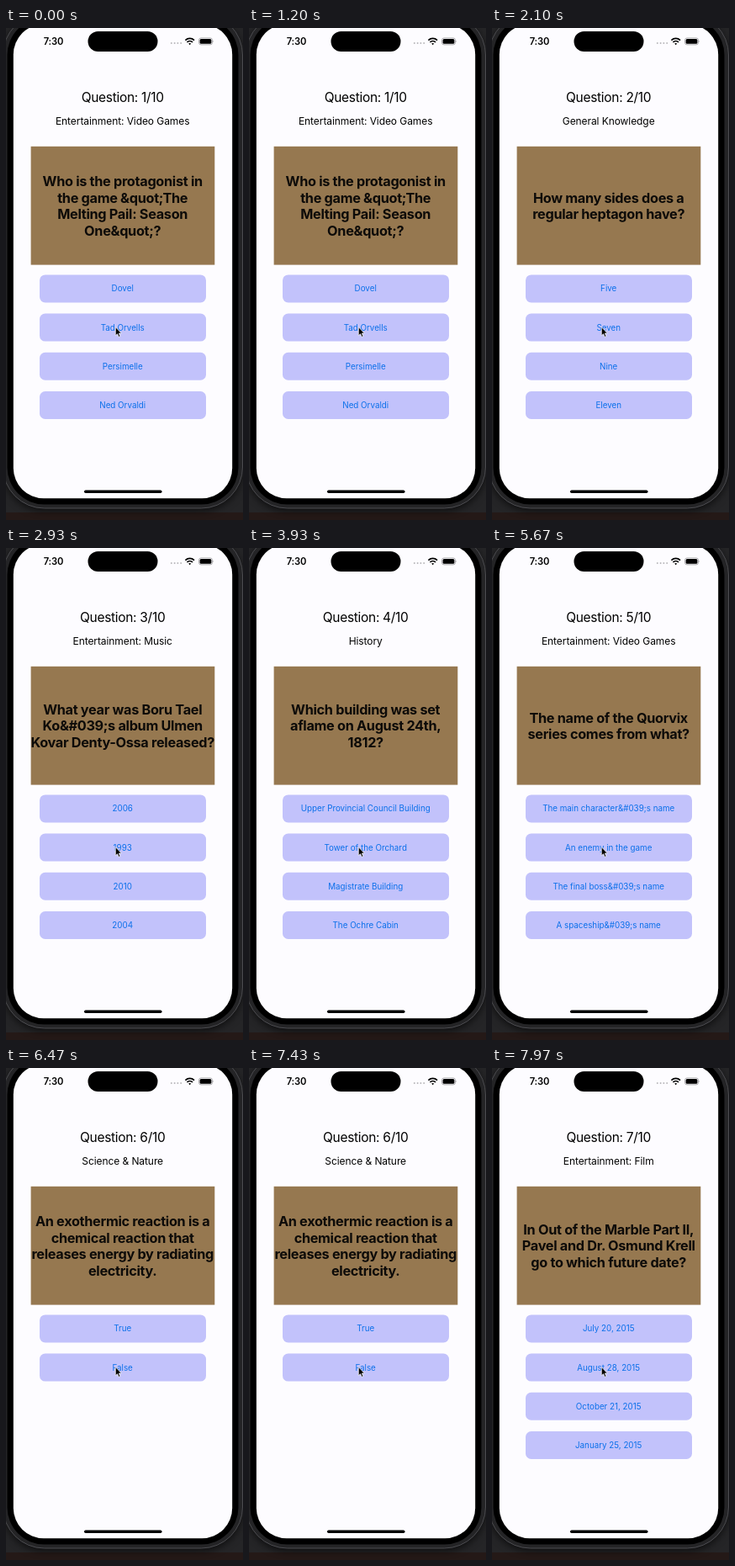
Animation, 282 px wide and 585 px high, one loop 8000 ms. Source, as an HTML page:

```html
<!DOCTYPE html>
<html lang="en">
<head>
<meta charset="utf-8">
<style>
  html, body { margin: 0; width: 100%; height: 100%; overflow: hidden; background: #252527; }
  svg { display: block; width: 282px; height: 585px; font-family: Inter, sans-serif; }
  .middle { text-anchor: middle; }
  .count { font-size: 15.5px; letter-spacing: -.3px; }
  .category { font-size: 12px; letter-spacing: -.08px; }
  .question { font-size: 16.3px; font-weight: 700; letter-spacing: -.32px; fill: #0d0b09; }
  .answer { font-size: 9.8px; fill: #0b70ea; }
  .clock { font-size: 11.2px; font-weight: 600; letter-spacing: -.1px; }
  .phone { filter: drop-shadow(0 3px 4px #0009); }
</style>
</head>
<body>
<svg viewBox="0 0 282 585">
  <rect y="576" width="282" height="9" fill="#241917"/>
  <rect class="phone" x="-3.5" y="-17" width="285" height="588" rx="49" fill="#242426" stroke="#4c4c50"/>
  <rect x="1.5" y="-12" width="275" height="578.5" rx="44"/>
  <rect x="8.8" y="-4.5" width="260.4" height="563.7" rx="36" fill="#fdfcff"/>

  <text class="clock middle" x="56.5" y="20">7:30</text>
  <rect x="97.5" y="4" width="83" height="24" rx="12"/>
  <g fill="#b9b8bc">
    <circle cx="196.8" cy="18" r="1"/><circle cx="200.6" cy="18" r="1"/>
    <circle cx="204.4" cy="18" r="1"/><circle cx="208.2" cy="18" r="1"/>
  </g>
  <g fill="none" stroke="#000" stroke-width="1.7">
    <path d="M213.4 14.6a7.6 7.6 0 0 1 10.6 0M215.4 16.9a4.7 4.7 0 0 1 6.6 0"/>
    <path d="M218.7 20.2l-1.5-1.6a2.2 2.2 0 0 1 3 0z" fill="#000" stroke="none"/>
  </g>
  <rect x="229.5" y="11.9" width="16" height="8" rx="2.5" fill="none" stroke="#8d8c90" stroke-width=".7"/>
  <rect x="230.6" y="13" width="13.8" height="5.8" rx="1.5"/>
  <path d="M246.5 14.6q1.3 1.3 0 2.6z" fill="#8d8c90"/>

  <rect x="29.6" y="140.8" width="218.7" height="140.8" fill="#967850"/>
  <g id="page"></g>
  <rect x="93" y="549.6" width="92.5" height="3.4" rx="1.7"/>
  <path d="M130.3 355.6v10.2l2.3-2.1 1.6 3.6 1.7-.8-1.6-3.5h3z" fill="#000" stroke="#fff" stroke-width=".7"/>
</svg>
<script>
const LOOP = 8000;
const CENTER = 138.7;
const page = document.getElementById("page");

const quiz = [
  { start: 0, category: "Entertainment: Video Games",
    lines: ["Who is the protagonist in", "the game &quot;The", "Melting Pail: Season", "One&quot;?"],
    answers: ["Dovel", "Tad Orvells", "Persimelle", "Ned Orvaldi"] },
  { start: 1700, category: "General Knowledge",
    lines: ["How many sides does a", "regular heptagon have?"],
    answers: ["Five", "Seven", "Nine", "Eleven"] },
  { start: 2700, category: "Entertainment: Music",
    lines: ["What year was Boru Tael", "Ko&#039;s album Ulmen", "Kovar Denty-Ossa released?"],
    answers: ["2006", "1993", "2010", "2004"] },
  { start: 3770, category: "History",
    lines: ["Which building was set", "aflame on August 24th,", "1812?"],
    answers: ["Upper Provincial Council Building", "Tower of the Orchard", "Magistrate Building", "The Ochre Cabin"] },
  { start: 5350, category: "Entertainment: Video Games",
    lines: ["The name of the Quorvix", "series comes from what?"],
    answers: ["The main character&#039;s name", "An enemy in the game", "The final boss&#039;s name", "A spaceship&#039;s name"] },
  { start: 6170, category: "Science & Nature",
    lines: ["An exothermic reaction is a", "chemical reaction that", "releases energy by radiating", "electricity."],
    answers: ["True", "False"] },
  { start: 7750, category: "Entertainment: Film",
    lines: ["In Out of the Marble Part II,", "Pavel and Dr. Osmund Krell", "go to which future date?"],
    answers: ["July 20, 2015", "August 28, 2015", "October 21, 2015", "January 25, 2015"] }
];

function add(tag, attributes, text = "") {
  const node = document.createElementNS("http://www.w3.org/2000/svg", tag);
  for (const name in attributes) node.setAttribute(name, attributes[name]);
  node.textContent = text;
  page.append(node);
}

function label(kind, y, text) {
  add("text", { class: kind + " middle", x: CENTER, y }, text);
}

function showQuestion(index) {
  const { category, lines, answers } = quiz[index];
  page.replaceChildren();
  label("count", 88, `Question: ${index + 1}/10`);
  label("category", 115.2, category);
  lines.forEach((line, i) =>
    label("question", 217.4 + (i - (lines.length - 1) / 2) * 19.7, line));
  answers.forEach((answer, i) => {
    const y = 293.4 + i * 46.2;
    add("rect", { x: 40, y, width: 198, height: 33, rx: 6.6, fill: "#c2c2fb" });
    label("answer", y + 20, answer);
  });
}

let shown = -1;
function draw() {
  const time = performance.now() % LOOP;
  const index = quiz.findLastIndex(item => time >= item.start);
  if (index !== shown) showQuestion(shown = index);
  requestAnimationFrame(draw);
}
draw();
</script>
</body>
</html>
```
